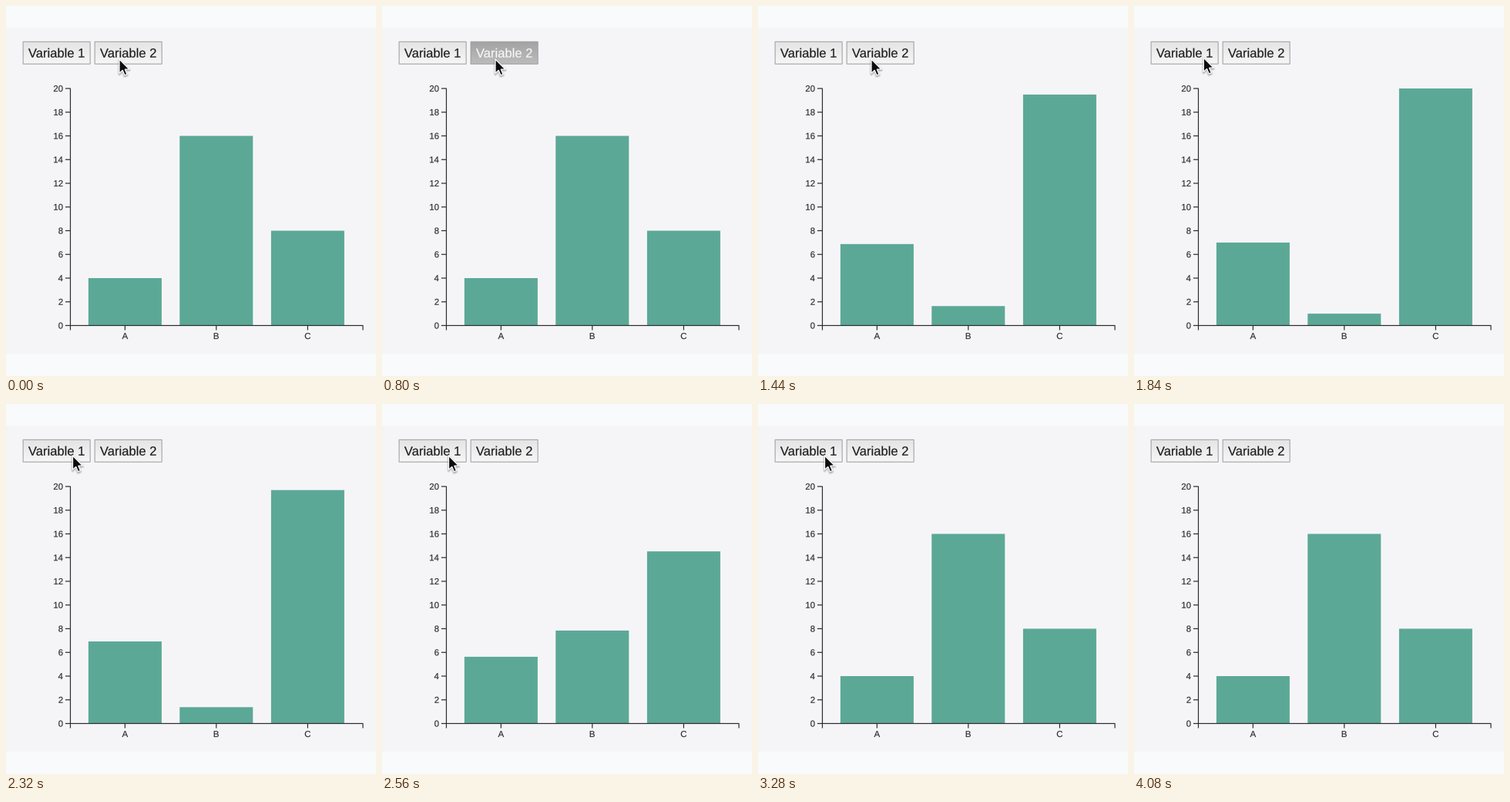
Recreate the animation shown at these times as a matplotlib script. Size 480 by 480 pixels, loop 4.24 s.

```python
import numpy as np
import matplotlib.pyplot as plt
from matplotlib.animation import FuncAnimation
from matplotlib.patches import PathPatch, Polygon, Rectangle
from matplotlib.textpath import TextPath
from matplotlib.transforms import Affine2D

SIZE, DPI = 480, 100
FRAMES, STEP = 53, 80
PX = 72 / DPI

PAGE, PANEL = "#f9fafc", "#f5f5f8"
BAR, INK = "#5ca897", "#2b2b2d"

X0, X1 = 83.5, 463
BASE, UNIT = 414.5, 15.375
BAR_W = 95
CENTERS = (154.4, 272.8, 391.4)
FIRST = np.array([4, 16, 8])
SECOND = np.array([7, 1, 20])

# Times are counted in frames.
PRESS_2, START_2 = 10, 10.2
PRESS_1, START_1 = 27, 27.15
MORPH = 10
MOVE_START, MOVE_END = 20, 24
POINTER_GONE = 51

fig = plt.figure(figsize=(SIZE / DPI, SIZE / DPI), dpi=DPI, facecolor=PAGE)
ax = fig.add_axes([0, 0, 1, 1])
ax.axis("off")


def rect(x, y, w, h, color, z):
    patch = Rectangle((x, y), w, h, facecolor=color, edgecolor="none",
                      zorder=z, snap=False)
    return ax.add_patch(patch)


def line(xs, ys, width=1.2, color=INK):
    ax.plot(xs, ys, color=color, lw=width * PX, zorder=4, snap=False,
            solid_capstyle="butt", solid_joinstyle="miter")


def label(text, x, baseline, size, align="center", color=INK):
    path = TextPath((0, 0), text, size=size, prop={"family": "Liberation Sans"})
    box = path.get_extents()
    anchor = box.x1 if align == "right" else (box.x0 + box.x1) / 2
    place = Affine2D().translate(-anchor, 0).scale(1, -1).translate(x, baseline)
    patch = PathPatch(place.transform_path(path), facecolor=color,
                      edgecolor=color, lw=0.12, zorder=6, snap=False)
    return ax.add_patch(patch)


class Button:
    TOP, BOTTOM = 46.4, 75.2

    def __init__(self, text, left, right):
        self.face = ax.imshow(np.zeros((29, 1, 3)), aspect="auto", zorder=3,
                              extent=(left, right, self.BOTTOM, self.TOP))
        self.edge = ax.add_patch(Rectangle(
            (left, self.TOP), right - left, self.BOTTOM - self.TOP,
            fill=False, lw=1.2 * PX, zorder=5, snap=False))
        self.text = label(text, (left + right) / 2 - 0.4, 66.7, 16.6)

    def show(self, pressed):
        top, bottom = (0.64, 0.735) if pressed else (0.895, 0.965)
        shade = np.linspace(top, bottom, 29)[:, None, None]
        self.face.set_data(np.repeat(shade, 3, axis=2))
        self.edge.set_edgecolor("#a2a2a2" if pressed else "#a9aaa9")
        color = "#f8f8f8" if pressed else "#1c1c1c"
        self.text.set_facecolor(color)
        self.text.set_edgecolor(color)


ARROW = 1.17 * np.array([(0, 0), (0, 15.6), (3.6, 12.3), (6, 17.8),
                         (8.6, 16.7), (6.3, 11.3), (11, 11.1)])


class Pointer:
    def __init__(self):
        self.layers = []
        for width, alpha in ((5, 0.05), (3.2, 0.08), (1.8, 0.1)):
            self.add("black", "black", width, alpha, 1.3)
        self.add("#0c0c0c", "white", 1.3, 1, 0)

    def add(self, face, edge, width, alpha, drop):
        patch = Polygon(ARROW, facecolor=face, edgecolor=edge, lw=width * PX,
                        alpha=alpha, zorder=8, joinstyle="round", snap=False)
        self.layers.append((ax.add_patch(patch), drop))

    def show(self, x, y, visible):
        for patch, drop in self.layers:
            patch.set_xy(ARROW + (x, y + drop))
            patch.set_visible(visible)


def ease(t):
    t = min(max(t, 0), 1)
    return 4 * t ** 3 if t < 0.5 else 1 - 4 * (1 - t) ** 3


rect(0, 28.5, SIZE, 422.5, PANEL, 1)
bars = [rect(c - BAR_W / 2, BASE, BAR_W, 0, BAR, 2) for c in CENTERS]

# Axes with outer ticks
line([X0 - 6.5, X0, X0, X0 - 6.5], [BASE - 20 * UNIT] * 2 + [BASE] * 2)
line([X0, X0, X1, X1], [BASE + 6, BASE, BASE, BASE + 6])
for value in range(0, 21, 2):
    y = BASE - value * UNIT
    if 0 < value < 20:
        line([X0 - 6.5, X0], [y, y])
    label(str(value), 73.6, y + 4, 11.4, "right")
for name, center in zip("ABC", CENTERS):
    line([center, center], [BASE, BASE + 6])
    label(name, center, 432, 11.4)

button_1 = Button("Variable 1", 22.2, 109.2)
button_2 = Button("Variable 2", 115.2, 202.2)
pointer = Pointer()

ax.set_xlim(0, SIZE)
ax.set_ylim(SIZE, 0)


def draw(i):
    mix = ease((i - START_2) / MORPH) - ease((i - START_1) / MORPH)
    for bar, value in zip(bars, FIRST + (SECOND - FIRST) * mix):
        bar.set_y(BASE - value * UNIT)
        bar.set_height(value * UNIT)

    button_1.show(i == PRESS_1)
    button_2.show(i == PRESS_2)

    move = ease((i - MOVE_START) / (MOVE_END - MOVE_START))
    pointer.show(147 - 60.5 * move, 69 - 2 * move, i < POINTER_GONE)
    return []


anim = FuncAnimation(fig, draw, frames=FRAMES, interval=STEP, repeat=True,
                     repeat_delay=0, init_func=lambda: draw(0))
plt.show()
```
